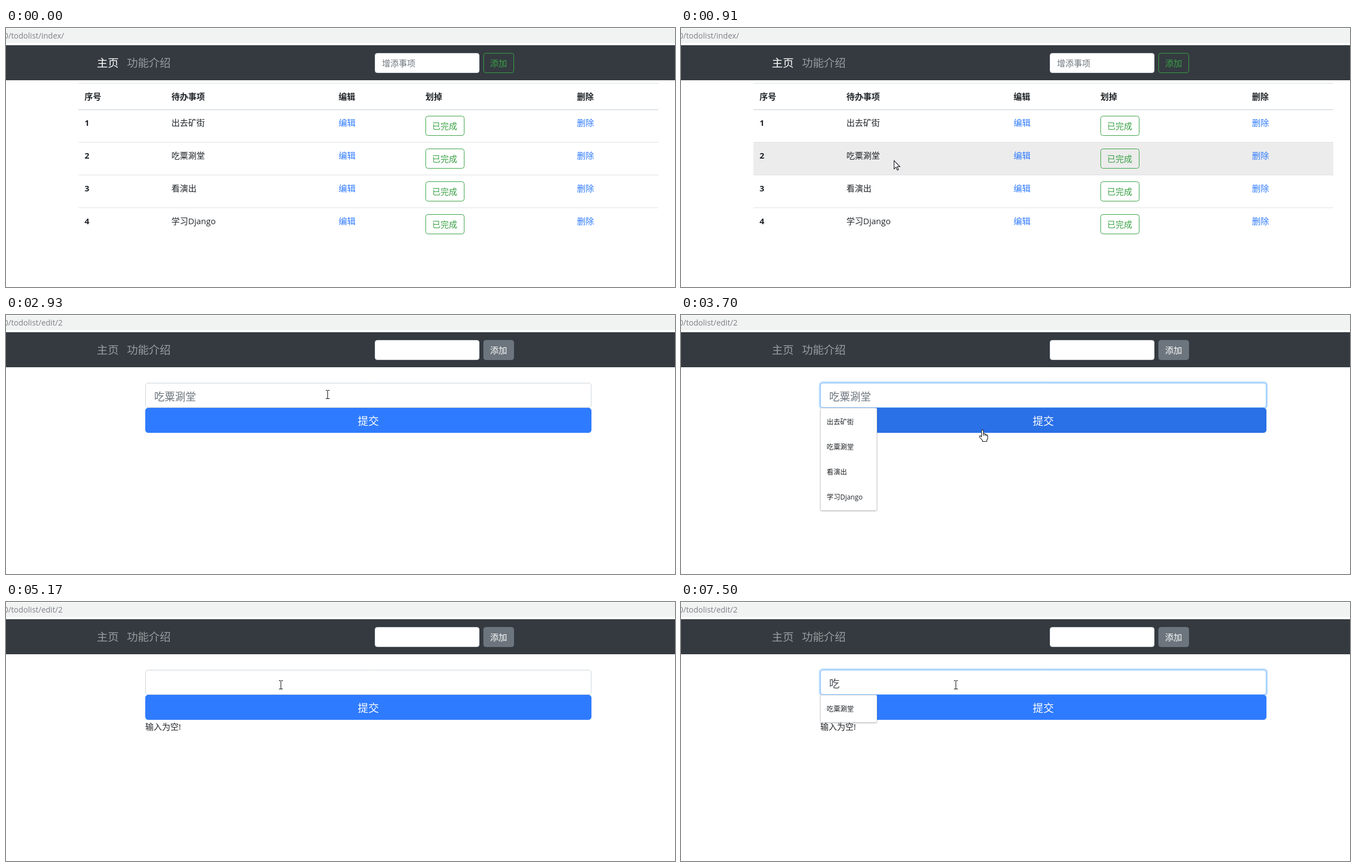
Recreate the animation shown at these times as an HTML page with a canvas. Size 1201 by 466 pixels, loop 8000 ms.

```html
<!DOCTYPE html>
<html lang="zh">
<head>
<meta charset="utf-8">
<title>Todo list</title>
<style>
  html, body { margin: 0; width: 100%; height: 100%; overflow: hidden; background: #fff; }
  canvas { display: block; }
</style>
</head>
<body>
<canvas id="stage" width="1201" height="466"></canvas>
<script>
const ctx = document.getElementById('stage').getContext('2d');
const LOOP = 8000;
const FONT = '"Open Sans", "Noto Sans CJK SC", "Noto Sans CJK", sans-serif';
const GREEN = '#3aa245', BLUE = '#2f7bff', INK = '#212529', LINE = '#dee2e6', GREY = '#6c757d';
const tasks = ['出去矿街', '吃粟涮堂', '看演出', '学习Django'];
const cols = [141, 297, 597, 753, 1025];

// Pointer moves: start, end, number of steps, [step, x, y] points
const moves = [
  [70, 840, 11, [[0, 552, 452], [3, 514, 301], [6, 468, 246], [10, 400, 239]]],
  [910, 1680, 11, [[0, 382, 238], [4, 304, 233], [6, 400, 240], [10, 626, 236]]],
  [1850, 1920, 2, [[0, 622, 235], [1, 619, 233]]],
  [2700, 3160, 7, [[0, 612, 222], [1, 600, 192], [3, 577, 143], [6, 577, 143]]],
  [3470, 3700, 4, [[0, 570, 152], [3, 541, 206]]],
  [3930, 4620, 10, [[0, 541, 206], [3, 541, 208], [4, 541, 217], [9, 505, 240]]],
  [4790, 5400, 9, [[0, 503, 234], [2, 498, 194], [5, 493, 149], [8, 493, 149]]]
];

const within = (v, a, b) => v >= a && v < b;
const inBox = (p, x, y, w, h) => p && within(p.x, x, x + w) && within(p.y, y, y + h);

function pointerAt(t) {
  let move = null;
  for (const m of moves) if (t >= m[0]) move = m;
  if (!move) return null;
  const [start, end, steps, pts] = move;
  const gap = (end - start) / (steps - 1);
  const k = Math.min(steps - 1, Math.floor((t - start) / gap + 0.05));
  let i = 0;
  while (i < pts.length - 2 && k > pts[i + 1][0]) i++;
  const [ka, xa, ya] = pts[i], [kb, xb, yb] = pts[i + 1];
  const f = (k - ka) / (kb - ka);
  return { x: Math.round(xa + (xb - xa) * f), y: Math.round(ya + (yb - ya) * f) };
}

function rect(x, y, w, h, color) {
  ctx.fillStyle = color;
  ctx.fillRect(x, y, w, h);
}

function box(x, y, w, h, fill, stroke, r = 4) {
  ctx.beginPath();
  ctx.roundRect(x + 0.5, y + 0.5, w - 1, h - 1, r);
  if (fill) { ctx.fillStyle = fill; ctx.fill(); }
  if (stroke) { ctx.strokeStyle = stroke; ctx.lineWidth = 1; ctx.stroke(); }
}

// cy is the vertical centre of the line
function text(s, x, cy, color, size = 15, weight = 400, align = 'left') {
  ctx.font = `${weight} ${size}px ${FONT}`;
  ctx.textAlign = align;
  ctx.fillStyle = color;
  ctx.fillText(s, x, cy + size * 0.38);
}

function drawTop(editing) {
  rect(0, 0, 1201, 466, '#fff');
  rect(0, 1, 1201, 26, '#f1f3f3');
  text(editing ? '0/todolist/edit/2' : '0/todolist/index/', -4, 13.7, '#7d8185', 14);
  rect(0, 31, 1201, 63, '#343a40');
  text('主页', 163, 63, editing ? '#999c9f' : '#fff', 19.7);
  text('功能介绍', 217, 63, '#999c9f', 19.7);
  box(662, 45, 188, 36, '#fff', '#ced4da');
  if (!editing) text('增添事项', 675, 63, GREY);
  box(857, 45, 55, 36, editing ? GREY : null, editing ? GREY : GREEN);
  text('添加', 869, 63, editing ? '#fff' : GREEN, 15.3);
}

function drawList(p) {
  rect(130, 99, 1041, 1, LINE);
  ['序号', '待办事项', '编辑', '划掉', '删除'].forEach((s, i) => text(s, cols[i], 123, INK, 15, 700));
  rect(130, 146, 1041, 2, LINE);
  tasks.forEach((task, i) => {
    const y = 147 + i * 59, cy = y + 23;
    if (inBox(p, 130, y, 1041, 59)) rect(130, y, 1041, 58, '#ececec');
    if (i) rect(130, y - 1, 1041, 1, LINE);
    const over = inBox(p, 597, cy - 9, 31, 18);
    text(String(i + 1), cols[0], cy, INK, 15, 700);
    text(task, cols[1], cy, INK);
    text('编辑', cols[2], cy, over ? '#2457ad' : BLUE, 15.3);
    if (over) rect(597, cy + 7, 31, 1, '#2457ad');
    box(753, y + 11, 70, 36, null, GREEN);
    text('已完成', 765, y + 29.5, GREEN);
    text('删除', cols[4], cy, BLUE, 15.3);
  });
}

function drawMenu(items) {
  const h = 5 + items.length * 45;
  ctx.save();
  ctx.shadowColor = 'rgba(0,0,0,.35)';
  ctx.shadowBlur = 3;
  ctx.shadowOffsetY = 1;
  box(250, 167, 102, h, '#fff', null, 2);
  ctx.restore();
  box(250, 167, 102, h, '#fff', '#d4d6d9', 2);
  items.forEach((s, i) => text(s, 261.5, 192 + i * 45, INK, 12.2));
}

function drawCandidates() {
  box(268, 176, 605, 50, '#f7f7f7', '#cfcfcf', 1);
  [...'吃持尺迟池赤齿'].forEach((c, i) => text(`${i + 1} ${c}`, 284 + i * 78, 201, '#222', 18));
}

function drawEdit(t, p) {
  const failed = t >= 3930;
  const focused = within(t, 3160, 3930) || t >= 5400;
  const composing = within(t, 6260, 6950);
  const hover = inBox(p, 250, 167, 801, 51);
  if (focused) box(247, 119, 807, 51, '#bfdeff', null, 7);
  box(250, 122, 801, 45, '#fff', focused ? '#80bdff' : '#ced4da', 4.5);
  const fill = hover ? '#2a70e6' : BLUE;
  box(250, 167, 801, 45, fill, fill, 4.5);
  text('提交', 650.5, 190.5, '#fff', 18.9, 400, 'center');
  if (failed) text('输入为空!', 250, 224, INK);
  else text(tasks[1], 266, 146.5, GREY, 18.8);

  let caret = 266;
  if (composing) {
    const typed = 'chi'.slice(0, 1 + Math.floor((t - 6260) / 76.6));
    text(typed, 266, 146.5, '#495057', 18.8);
    const w = Math.round(ctx.measureText(typed).width);
    rect(266, 157, w, 1, '#495057');
    caret += w;
    drawCandidates();
  } else if (t >= 6950) {
    text('吃', 266, 146.5, '#495057', 18.8);
    caret = 285;
    drawMenu([tasks[1]]);
  } else if (focused) {
    drawMenu(tasks);
  }
  const lit = within(t, 3160, 3700) || within(t, 5400, 5800) || within(t, 6260, 7500);
  if (lit) rect(caret, 132, 1, 26, '#495057');
}

const shapes = {
  arrow: new Path2D('M.5 .5V15.5L4 12.3 6.4 17.7 8.5 16.8 6.1 11.5H11Z'),
  hand: new Path2D('M4.5 13V2.4Q4.5 .6 6.2 .6 7.9 .6 7.9 2.4V7.7Q10.7 7 11 8.7 13.3 8.1 13.6 9.8 15.6 9.6 15.6 11.6V15.5Q15.6 17.2 14 19.2V21.5H6.2V19.6L1.2 14Q.1 12.4 1.3 11.5 2.6 10.9 4.5 13Z')
};

function drawPointer(p, editing) {
  const beam = editing ? inBox(p, 250, 122, 801, 45) : inBox(p, 297, 221, 60, 18);
  if (beam) {
    const { x, y } = p;
    rect(x, y - 7, 1, 15, '#111');
    for (const row of [y - 8, y + 7]) {
      rect(x - 3, row, 3, 1, '#111');
      rect(x + 1, row, 3, 1, '#111');
    }
    return;
  }
  const hand = editing ? inBox(p, 250, 167, 801, 45) : inBox(p, 597, 221, 31, 18);
  ctx.save();
  ctx.translate(p.x - (hand ? 6 : 0), p.y);
  const shape = hand ? shapes.hand : shapes.arrow;
  ctx.fillStyle = '#fff';
  ctx.fill(shape);
  ctx.strokeStyle = '#1a1a24';
  ctx.lineWidth = 1.1;
  ctx.stroke(shape);
  if (hand) {
    ctx.beginPath();
    for (const x of [7.9, 11]) { ctx.moveTo(x, 8); ctx.lineTo(x, 11.5); }
    ctx.moveTo(13.6, 9.8);
    ctx.lineTo(13.6, 12);
    ctx.stroke();
  }
  ctx.restore();
}

const begin = performance.now();
function frame() {
  const t = (performance.now() - begin) % LOOP;
  const editing = t >= 2390;
  const p = pointerAt(t);
  drawTop(editing);
  if (editing) drawEdit(t, p);
  else drawList(p);
  if (p) drawPointer(p, editing);
  requestAnimationFrame(frame);
}
frame();
</script>
</body>
</html>
```
